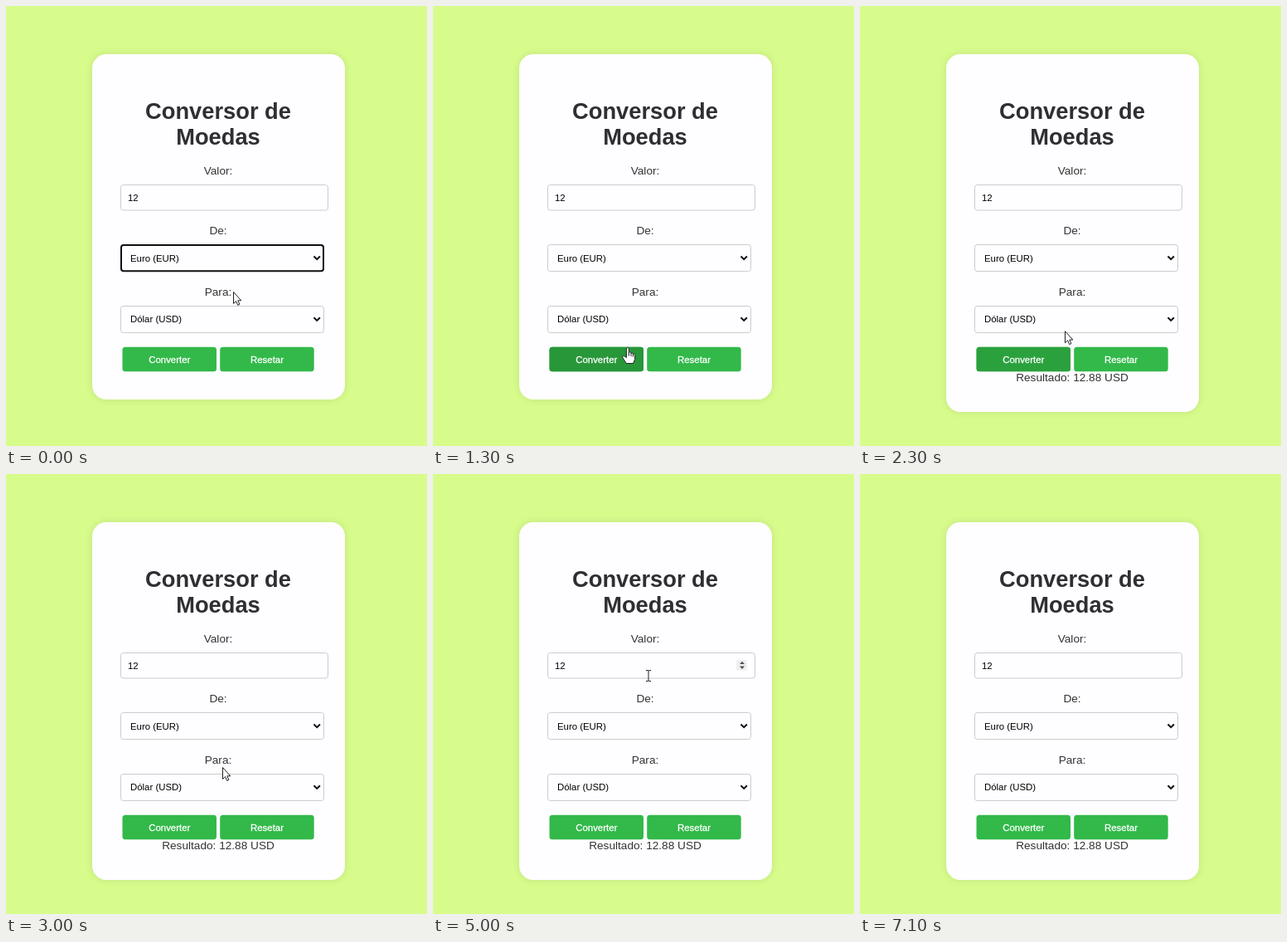
An HTML page that plays this animation: 508 by 530 pixels, repeating every 7.8 s.

```html
<!DOCTYPE html>
<html lang="pt">
<head>
<meta charset="utf-8">
<title>Conversor de Moedas</title>
<style>
html, body { margin: 0; width: 100%; height: 100%; overflow: hidden; background: #d7fc8c; }
svg { display: block; width: 508px; height: 530px; font-family: "Liberation Sans", Arial, sans-serif; }
#card { fill: #fefdff; filter: drop-shadow(0 0 4px rgba(0, 0, 0, .1)); }
.mid { text-anchor: middle; }
.title { font-size: 27.3px; font-weight: bold; fill: #2f2f31; }
.label { font-size: 13.65px; fill: #333; }
.value { font-size: 11.4px; fill: #000; }
.field { fill: #fefdff; stroke: #ccc; }
.chevron { fill: none; stroke: #111; stroke-width: 2; }
.button { fill: #32b949; }
.caption { font-size: 11.4px; fill: #fff; stroke: #fff; stroke-width: .3; }
.cursor { fill: #fff; stroke: #222; stroke-width: 1; stroke-linejoin: round; }
</style>
</head>
<body>
<svg viewBox="0 0 508 530">
  <rect id="card" x="104" y="58" width="305" height="416" rx="17"/>
  <g class="title mid">
    <text x="256" y="135.5">Conversor de</text>
    <text x="256" y="166.7">Moedas</text>
  </g>
  <g class="label mid">
    <text x="256" y="203">Valor:</text>
    <text x="256" y="275">De:</text>
    <text x="256" y="349">Para:</text>
    <text id="result" x="256" y="452">Resultado: 12.88 USD</text>
  </g>
  <g class="field">
    <rect x="138.5" y="215.5" width="250" height="30.5" rx="3"/>
    <rect x="138.5" y="287.5" width="245" height="32" rx="3"/>
    <rect x="138.5" y="361.5" width="245" height="32" rx="3"/>
  </g>
  <rect id="focus" x="139" y="288" width="244" height="31.3" rx="3" fill="none" stroke="#101010" stroke-width="2"/>
  <g class="value">
    <text x="147" y="234.7">12</text>
    <text x="150" y="307.5">Euro (EUR)</text>
    <text x="150" y="381">Dólar (USD)</text>
  </g>
  <path class="chevron" d="M371.5 301.5l3.7 3.7 3.7-3.7M371.5 375.2l3.7 3.7 3.7-3.7"/>
  <g id="spinner">
    <rect x="366" y="224" width="13" height="12.5" fill="#efefef"/>
    <path d="M370 229l3-3.3 3 3.3zM370 231.6l3 3.3 3-3.3z" fill="#505050"/>
  </g>
  <g class="button">
    <rect x="140.5" y="410.7" width="113.5" height="29.5" rx="3.5"/>
    <rect x="258.2" y="410.7" width="113.5" height="29.5" rx="3.5"/>
  </g>
  <rect id="hover" x="140.5" y="410.7" width="113.5" height="29.5" rx="3.5" fill="#289739"/>
  <g class="caption mid">
    <text x="197.3" y="429.5">Converter</text>
    <text x="315" y="429.5">Resetar</text>
  </g>
  <g id="pointer" class="cursor">
    <path id="arrow" d="M.5.5V14.5L3.6 11.6 5.7 16.4 7.9 15.4 5.8 10.8H9.8Z"/>
    <g id="hand">
      <path d="M-1.6 12.5V1.8C-1.6.1 1.3.1 1.3 1.8V7C1.3 5.4 4 5.5 4 7.2V8C4 6.5 6.4 6.7 6.4 8.2V9C6.4 7.7 8.6 7.9 8.6 9.5V14.5L6.6 19.5H-1.6L-6 13C-7.2 11.1-5 9.8-3.7 11.1Z"/>
      <path d="M1.3 7V10.5M4 8V11M6.4 9V11.5" fill="none"/>
    </g>
    <path id="beam" d="M-3-6.5H-1L0-5.8 1-6.5H3M0-5.8V5.8M-3 6.5H-1L0 5.8 1 6.5H3" fill="none"/>
  </g>
</svg>
<script>
const LOOP = 7800, STEP = 100;
const $ = id => document.getElementById(id);
const show = (id, on) => $(id).style.display = on ? "" : "none";
const within = (t, a, b) => t >= a && t < b;
const clamp = v => Math.min(1, Math.max(0, v));

// Pointer path: time, x, y
const path = [
  [0, 274, 344], [300, 262, 378], [500, 244, 414], [800, 238, 413], [1000, 238, 413],
  [1300, 235, 411], [1700, 229, 412], [1900, 230, 413], [2200, 243, 400], [2600, 259, 365],
  [3000, 261, 353], [3400, 275, 295], [3700, 275, 280], [4000, 275, 280], [4100, 275, 273],
  [4500, 262, 255], [4800, 262, 255], [5000, 260, 243], [5300, 260, 240], [6600, 260, 240],
  [6700, 261, 222], [6900, 276, 95], [7000, 266, 36], [7100, 262, -30], [LOOP, 262, -30]
];

function pointerAt(t) {
  const i = path.findIndex(p => p[0] > t);
  const [t0, x0, y0] = path[i - 1], [t1, x1, y1] = path[i];
  const k = (t - t0) / (t1 - t0);
  return [x0 + (x1 - x0) * k, y0 + (y1 - y0) * k];
}

function draw() {
  const t = Math.floor(performance.now() % LOOP / STEP) * STEP;
  const onButton = within(t, 500, 2200), inInput = within(t, 5000, 6700);
  const done = t >= 1500;
  $("card").setAttribute("height", done ? 431 : 416);
  show("result", done);
  show("focus", t < 700);
  show("spinner", inInput);
  show("hand", onButton);
  show("beam", inInput);
  show("arrow", !onButton && !inInput);
  $("hover").style.opacity = Math.min(clamp((t - 400) / 300), clamp((2500 - t) / 300));
  $("pointer").setAttribute("transform", `translate(${pointerAt(t)})`);
  requestAnimationFrame(draw);
}
draw();
</script>
</body>
</html>
```
